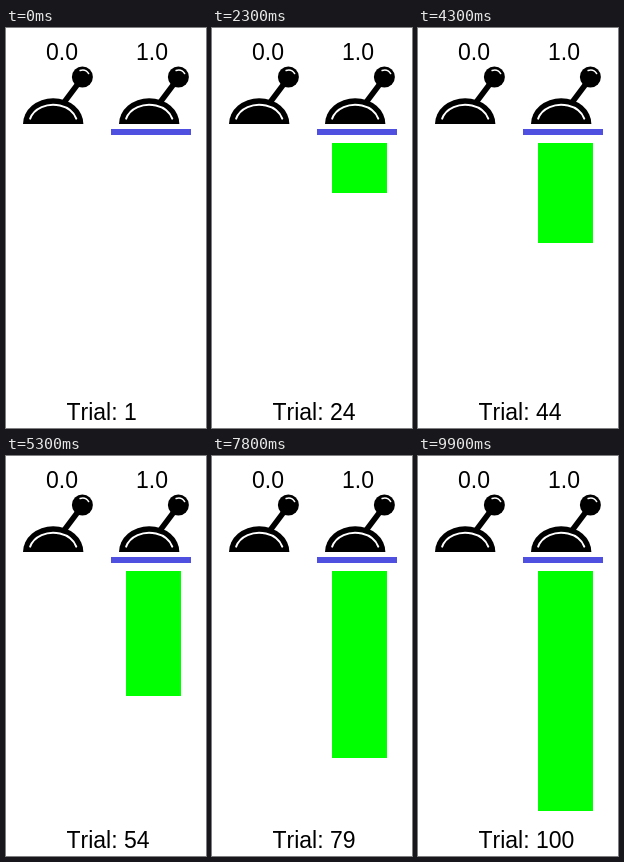
Write an HTML page with a canvas that moves like this. It is 200x400 px and loops after 10 s.

```html
<!DOCTYPE html>
<html lang="en">
<head>
<meta charset="utf-8">
<title>Two levers</title>
<style>
html, body { margin: 0; width: 100%; height: 100%; overflow: hidden; background: #fff; }
canvas, svg { display: block; position: absolute; left: 0; top: 0; }
text { font: 23px "Liberation Sans", Arial, sans-serif; font-kerning: none; fill: #000; }
</style>
</head>
<body>
<canvas id="stage" width="200" height="400"></canvas>
<svg width="200" height="400">
  <text x="40" y="32">0.0</text>
  <text x="130" y="32">1.0</text>
  <text id="label" x="60.5" y="392">Trial: 1</text>
</svg>
<script>
const ctx = document.getElementById('stage').getContext('2d');
const label = document.getElementById('label');
const STEP = 100, TRIALS = 100, GAIN = 2.5;
const leftPicks = [2, 3, 5];

function arc(x, y, rx, ry, from, to, width) {
  ctx.beginPath();
  ctx.ellipse(x, y, rx, ry, 0, from * Math.PI, to * Math.PI);
  ctx.lineWidth = width;
  ctx.lineCap = 'round';
  ctx.strokeStyle = '#fff';
  ctx.stroke();
}

function drawLever(x) {
  ctx.save();
  ctx.translate(x, 0);
  ctx.fillStyle = ctx.strokeStyle = '#000';
  ctx.lineWidth = 5.6;
  ctx.beginPath();
  ctx.moveTo(57.4, 75.2);
  ctx.lineTo(72.4, 55.2);
  ctx.stroke();
  ctx.beginPath();
  ctx.arc(76.4, 49, 10.5, 0, 2 * Math.PI);
  ctx.fill();
  ctx.beginPath();
  ctx.ellipse(47.2, 96, 30.2, 25.8, 0, Math.PI, 2 * Math.PI);
  ctx.fill();
  arc(47.2, 96, 24, 19.3, 1.09, 1.91, 2);
  arc(76.4, 49.5, 7.4, 7.4, 1.4, 1.82, 1.5);
  ctx.restore();
}

function draw(trial) {
  ctx.fillStyle = '#fff';
  ctx.fillRect(0, 0, 200, 400);
  drawLever(0);
  drawLever(96);

  ctx.fillStyle = '#5050e0';
  ctx.fillRect(leftPicks.includes(trial) ? 10 : 105, 101, 80, 6);

  // Each earlier pick of the right lever adds to the bar.
  const wins = trial - 1 - leftPicks.filter(n => n < trial).length;
  ctx.fillStyle = '#0f0';
  ctx.fillRect(120, 115, 55, Math.floor(wins * GAIN));
  label.textContent = 'Trial: ' + trial;
}

let shown = 0;
const start = performance.now();
function tick() {
  const t = Math.max(0, performance.now() - start);
  const trial = Math.floor(t / STEP) % TRIALS + 1;
  if (trial !== shown) draw(shown = trial);
  requestAnimationFrame(tick);
}
tick();
</script>
</body>
</html>
```
